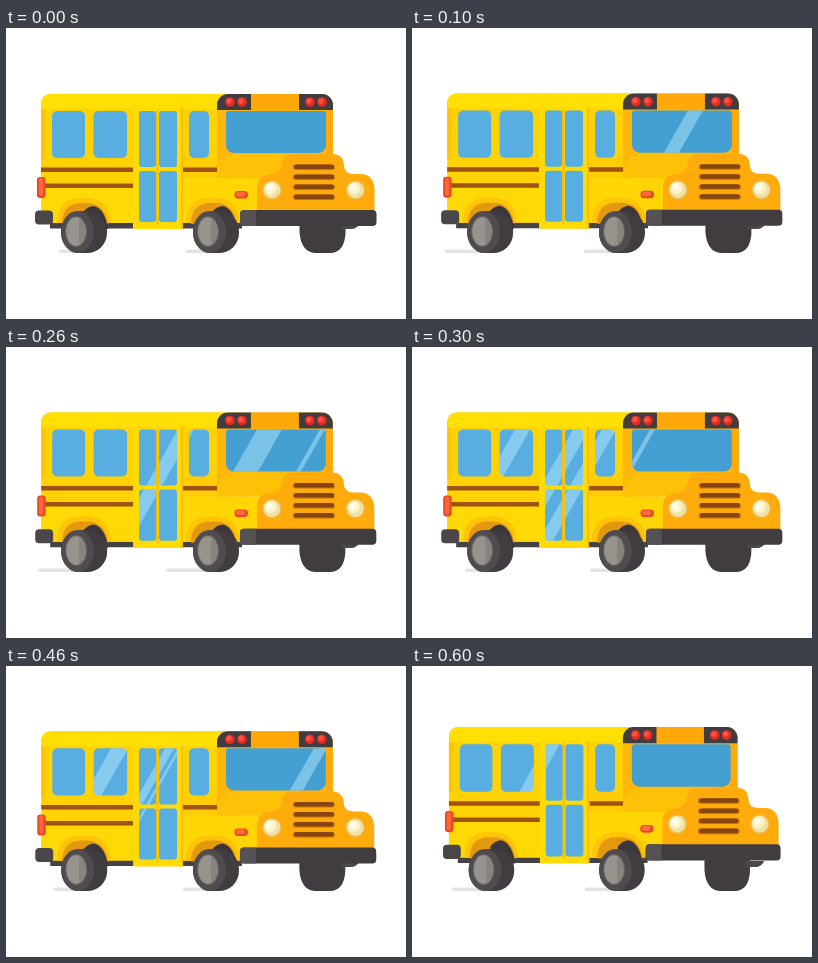
An HTML page with a canvas for the animation above (700 ms loop, 400 px wide and 291 px high).

```html
<!DOCTYPE html>
<html lang="en">
<head>
<meta charset="utf-8">
<title>School bus</title>
<style>
html, body { margin: 0; width: 100%; height: 100%; overflow: hidden; background: #fff; }
canvas { display: block; width: 400px; height: 291px; }
</style>
</head>
<body>
<canvas id="stage" width="400" height="291"></canvas>
<script>
const ctx = document.getElementById('stage').getContext('2d');
const STEP = 100, STEPS = 7;
const YELLOW = '#ffd206', LIGHT = '#ffdf04', ORANGE = '#ffab0c', DARK = '#403c3f', BROWN = '#a0520e';

// body height above rest, and left ends of the two ground streaks
const lift = [0, .4, .5, .5, .7, 2, 5];
const streaks = [[53, 180], [33, 172], [32, 160], [53, 178], [47, 177], [25, 168], [40, 173]];

const panes = [
  [46, 83, 33, 47, 5], [87.5, 83, 33.5, 47, 5], [183, 83, 20, 47, 5],
  [133, 83, 17, 56, 3], [153, 83, 18, 56, 3],
  [133, 143, 17, 51, 3], [153, 143, 18, 51, 3]
];
const windshield = [220, 83, 100, 42, [3, 3, 8, 8]];

// slanted reflections per step: left edge at the top of the glass, width
const sideGleams = [
  [], [],
  [[172, 16]],
  [[103, 15], [161, 16], [190, 14]],
  [[105, 17], [159, 9], [172, 3]],
  [[62, 13], [184, 6], [193, 11]],
  [[133, 14]]
];
const frontGleams = [[], [[276, 15]], [[251, 25], [314, 5]], [[238, 5]], [[308, 13]], [], []];

function box(x, y, w, h, r, fill) {
  ctx.beginPath();
  ctx.roundRect(x, y, w, h, r);
  ctx.fillStyle = fill;
  ctx.fill();
}

function oval(x, y, rx, ry, fill) {
  ctx.beginPath();
  ctx.ellipse(x, y, rx, ry, 0, 0, Math.PI * 2);
  ctx.fillStyle = fill;
  ctx.fill();
}

function shape(d, fill) {
  ctx.fillStyle = fill;
  ctx.fill(new Path2D(d));
}

function glass([x, y, w, h, r], color, bands) {
  ctx.save();
  box(x, y, w, h, r, color);
  ctx.clip();
  ctx.fillStyle = 'rgba(185,235,250,.47)';
  const top = 83, drop = 112, slant = drop * .57;
  for (const [left, width] of bands) {
    ctx.beginPath();
    ctx.moveTo(left, top);
    ctx.lineTo(left + width, top);
    ctx.lineTo(left + width - slant, top + drop);
    ctx.lineTo(left - slant, top + drop);
    ctx.fill();
  }
  ctx.restore();
}

function wheel(x) {
  box(x - 23, 183, 46, 42, 20, DARK);
  oval(x - 6.5, 204, 16.5, 21, '#4f4b4e');
  oval(x - 8, 203.5, 10.8, 15.3, '#6d6a67');
  oval(x - 8, 203.5, 9.8, 14.3, '#96948c');
  ctx.save();
  ctx.beginPath();
  ctx.rect(x - 5, 186, 10, 36);
  ctx.clip();
  oval(x - 8, 203.5, 9.8, 14.3, '#86847d');
  ctx.restore();
}

function arch(x) {
  shape(`M${x - 28} 195V191Q${x - 26} 170 ${x - 4} 170H${x + 3}Q${x + 24} 171 ${x + 26} 195Z`, '#ffc308');
  shape(`M${x - 23} 196V193Q${x - 21} 175 ${x - 4} 175H${x + 3}Q${x + 20} 176 ${x + 23} 196Z`, '#e2980f');
  shape(`M${x - 2} 201V184Q${x + 3} 178 ${x + 9} 178Q${x + 20} 181 ${x + 23} 201Z`, '#3a3639');
}

function side(bands) {
  box(44, 190, 192, 10.5, 0, '#454144');
  box(35, 66, 185, 129, [9, 0, 0, 3], YELLOW);
  box(35, 66, 185, 15, [9, 0, 0, 0], LIGHT);
  box(35, 81, 4, 50, 0, '#ffc407');
  box(35, 160, 92, 35, [0, 0, 0, 3], '#ffd905');
  box(176, 130, 40, 65, 0, '#ffcd07');
  box(176, 150, 60, 45, 0, '#ffd705');
  for (const y of [139.5, 155.5]) box(35, y, 92, 4.5, 0, BROWN);
  box(177, 139.5, 36, 4.5, 0, BROWN);
  arch(79);
  box(127, 80, 50, 121, 0, '#ffdb05');
  box(175, 80, 2, 121, 0, '#f8bd05');
  box(150, 82, 2.5, 114, 0, '#f8c006');
  for (const pane of panes) glass(pane, '#58aee0', bands);
  box(31, 149, 8.5, 21, 3, '#e94a25');
  box(33, 150, 4, 18, 2, '#ff6738');
  box(29, 182.5, 18, 14, 4, '#4a464a');
}

function lamps(x) {
  for (const cx of [x, x + 12]) {
    oval(cx, 74, 4.8, 4.8, '#e62c20');
    oval(cx - 1, 73, 2.7, 2.7, '#ff5044');
  }
}

function headlight(x) {
  oval(x, 162, 9.5, 9.5, '#e9bf62');
  oval(x, 162, 8.3, 8.3, '#f0e2a6');
  oval(x - 1.5, 160.5, 6, 6, '#fff4c8');
  oval(x - 2.5, 159.5, 3, 3, '#fffdf0');
}

function nose(bands) {
  box(211, 66, 116, 84, [11, 11, 0, 0], '#ffb70b');
  box(245, 66, 48, 16, 0, '#ffa80a');
  box(320, 82, 7, 46, 0, '#ffa90b');
  box(211, 66, 34, 16, [11, 0, 0, 0], DARK);
  box(293, 66, 34, 16, [0, 11, 0, 0], DARK);
  lamps(224);
  lamps(304);
  glass(windshield, '#449fd3', bands);

  box(211, 150, 50, 34, 0, '#ffd505');
  arch(208);
  shape('M211 150Q212 126 228 126H300V150Z', '#ffc108');
  shape('M276 183V136Q276 126 287 126H327Q337 126 338 137Q338 146 348 146H356Q367 147 368.5 160V183H251V160Q251 149 261 147Q275 146 276 136Z', ORANGE);
  for (const y of [136.5, 146.5, 156.5, 166.5]) {
    box(287, y, 42, 5.5, 2.7, '#c87509');
    box(288, y, 40, 4.5, 2.2, '#87450f');
  }
  headlight(266);
  headlight(349.5);
  box(228.5, 163, 13.5, 7.5, 3.5, '#e94a25');
  box(230, 164, 9, 4.5, 2, '#ff6b3c');
}

function bumper() {
  box(234, 182, 136.5, 16, 4, DARK);
  box(234, 182, 16, 16, [4, 0, 0, 4], '#555154');
}

// squeezes the bus toward its middle and raises it
function place(rise, squeeze, paint) {
  ctx.save();
  ctx.translate(202, 200 - rise);
  ctx.scale(1 - squeeze, rise ? 1 + squeeze : 1);
  ctx.translate(-202, -200);
  paint();
  ctx.restore();
}

function draw(step) {
  const rise = lift[step] * .7, squeeze = lift[step] * .0023;
  ctx.fillStyle = '#fff';
  ctx.fillRect(0, 0, 400, 291);

  const [rear, front] = streaks[step];
  box(rear, 221.5, 78 - rear, 3.5, 1.7, '#e4e3e3');
  box(front, 221.5, 208 - front, 3.5, 1.7, '#e4e3e3');

  place(0, squeeze, () => {
    shape('M293.5 190H339.5V206Q338 225 324 225H309Q295 224 293.5 204Z', DARK);
    shape('M335 195H354Q351 201 345 201H335Z', '#4b474a');
  });
  place(rise, squeeze, () => {
    side(sideGleams[step]);
    nose(frontGleams[step]);
  });
  place(0, squeeze, () => {
    wheel(78);
    wheel(210);
  });
  place(rise, squeeze, bumper);
}

const start = performance.now();
function tick() {
  draw(Math.floor((performance.now() - start) / STEP) % STEPS);
  requestAnimationFrame(tick);
}
tick();
</script>
</body>
</html>
```
